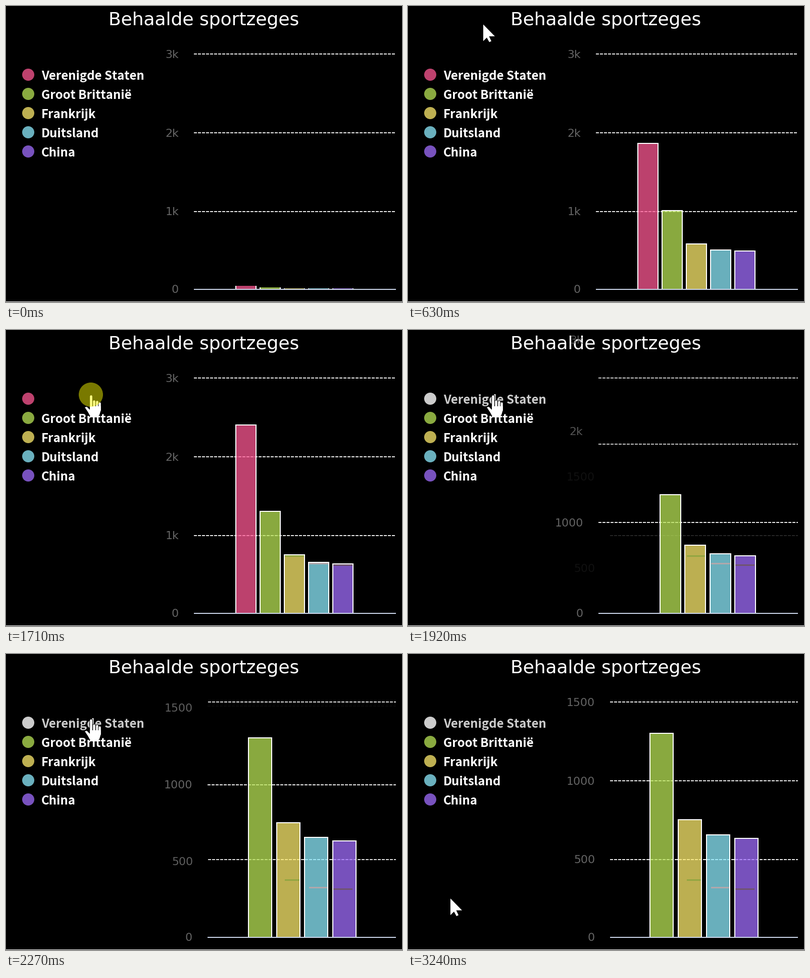
Animation of 784x586 px, one loop 3300 ms. Source, as a matplotlib script:

```python
import math

import matplotlib.pyplot as plt
from matplotlib.animation import FuncAnimation
from matplotlib.patches import Circle, Polygon, Rectangle
from matplotlib.patheffects import withStroke
from matplotlib.transforms import Affine2D

W, H, DPI = 784, 586, 100
PX = 72 / DPI
LOOP, INTERVAL, TICKS = 3300, 20, 48

# Chart geometry: axis line, height of the plot, and the two full scales
BASE, SPAN = 561, 467
WIDE, NARROW = 3000, 1500

# Ticks at which something happens
STREAK, HOVER, CLICK, REDRAW, LEAVE = 12, 17, 25, 26, 43

MEDALS = {
    "Verenigde Staten": (2400, (190, 66, 110)),
    "Groot Brittanië": (1302, (138, 170, 64)),
    "Frankrijk": (750, (190, 176, 82)),
    "Duitsland": (655, (106, 176, 190)),
    "China": (633, (120, 82, 190)),
}
STREAK_COLORS = {2: "#92a642", 3: "#b0a8ac", 4: "#705470"}


def rgb(color):
    return tuple(c / 255 for c in color)


def mix(a, b, p):
    return a + (b - a) * p


def ease(p):
    return 0.5 - 0.5 * math.cos(math.pi * min(max(p, 0), 1))


def scaled(value, p):
    """Height of a value while the scale goes from wide to narrow."""
    return mix(SPAN * value / WIDE, SPAN * value / NARROW, p)


def pointer_at(tick):
    """Glide in to the first legend item, later swing away to the lower left."""
    if tick < LEAVE:
        e = 1 - max(1 - (tick - 5) / 14, 0) ** 1.45
        return mix(137, 168, e), mix(-21, 128, e)
    e = 1 - (1 - (tick - 42) / 5) ** 2
    return mix(168, 84, e) - 45 * math.sin(math.pi * e), mix(128, 484, e)


fig = plt.figure(figsize=(W / DPI, H / DPI), dpi=DPI, facecolor="black")
ax = fig.add_axes([0, 0, 1, 1])
ax.set_xlim(0, W)
ax.set_ylim(H, 0)
ax.axis("off")


def text(x, y, label, size, color="white", font="DejaVu Sans", **kwargs):
    return ax.text(x, y, label, fontsize=size * PX, color=color, family=font,
                   va="baseline", **kwargs)


def rect(x, y, w, h, color, z=3, **kwargs):
    return ax.add_patch(Rectangle((x, y), w, h, color=color, lw=0, zorder=z, **kwargs))


class Bar:
    """Translucent column with a white border on the left, top and right."""

    def __init__(self, index, value, color):
        self.index, self.value = index, value
        bright = tuple(min(c / 0.75, 1) for c in rgb(color))
        self.fill = rect(0, 0, 0, 0, bright, alpha=0.75)
        self.edges = [rect(0, 0, 0, 0, "white", 5) for _ in range(3)]

    def place(self, p, grow):
        left = round(mix(454 + 48 * self.index, 422 + 56 * self.index, p))
        width = round(mix(42, 48, p))
        height = round(scaled(self.value, p) * grow)
        top = BASE - height
        self.right = left + width
        self.fill.set_bounds(left + 2, top, width - 4, height)
        self.edges[0].set_bounds(left, top, 2, height)
        self.edges[1].set_bounds(self.right - 2, top, 2, height)
        self.edges[2].set_bounds(left, top, width, 2 * grow)

    def show(self, visible):
        for part in (self.fill, *self.edges):
            part.set_visible(visible)


class GridLine:
    """Dashed line and label; `fade` is "in" or "out" if only one scale has it."""

    def __init__(self, value, label, fade=None):
        self.value, self.fade = value, fade
        self.line, = ax.plot([], [], color="#e6e6e6", lw=2 * PX, ls=(0, (3, 1)), zorder=2)
        self.label = text(0, 0, label, 22, "#666666", ha="right")

    def y(self, p):
        return BASE + 1 - scaled(self.value, p)

    def place(self, p):
        slide = 1 if self.fade == "in" else p
        end = max(self.y(1), BASE + 1 - SPAN)
        y = math.ceil(mix(self.y(0), end, slide))
        self.line.set_data([mix(372, 400, slide), 772], [y, y])
        self.label.set_position((mix(342, 370, slide), self.y(p) + 8))
        for part in (self.line, self.label):
            part.set_alpha({"in": p, "out": 1 - p}.get(self.fade, 1))


text(391.5, 38, "Behaalde sportzeges", 36, ha="center")
markers, names, bars = [], [], []
for i, (country, (value, color)) in enumerate(MEDALS.items()):
    markers.append(ax.add_patch(Circle((44, 136 + 38 * i), 12, fc=rgb(color), lw=0)))
    names.append(text(70, 146 + 38 * i, country, 24, font="Noto Sans CJK JP", weight="bold"))
    bars.append(Bar(i, value, color))
first_color = markers[0].get_facecolor()

streaks = {i: rect(456 + 48 * i, BASE - scaled(bars[i].value, 0) + 2, 38, 3, color, 4)
           for i, color in STREAK_COLORS.items()}

grid = [GridLine(3000, "3k", "out"), GridLine(2000, "2k", "out"), GridLine(1000, "1k"),
        GridLine(1500, "1500", "in"), GridLine(500, "500", "in")]
thousand = grid[2].label
zero_line, = ax.plot([], [], color="#ccd6eb", lw=2 * PX, solid_capstyle="butt", zorder=6)
zero_label = text(342, 568, "0", 22, "#666666", ha="right")
rect(0, H - 1, W, 1, "white")

# Both pointers are drawn around their tip and moved by one shared transform.
move = Affine2D()
outlined = dict(transform=move + ax.transData, zorder=8)


def stroke(width):
    return [withStroke(linewidth=width * PX, foreground="black")]


def shape(points):
    return ax.add_patch(Polygon(points, fc="white", lw=0, path_effects=stroke(2), **outlined))


arrow = shape([(0, 0), (0, 33), (7, 26), (12, 35), (16, 33), (11.5, 23.5), (23, 23.5)])
hand = [ax.plot([x, x], [top, 30], color="white", lw=4.6 * PX, solid_capstyle="round",
                path_effects=stroke(6.6), **outlined)[0]
        for x, top in zip((0, 5.8, 11.6, 17.4), (3, 13, 14, 17))]
hand.append(ax.add_patch(Polygon(
    [(-2, 30), (-8, 24), (-12, 25), (-6, 34), (-1, 43), (3, 45), (12, 45),
     (17, 40), (19.7, 31), (19.7, 23), (-2, 23)], fc="white", lw=0, **outlined)))
click = ax.add_patch(Circle((168, 128), 24, fc="#ffff00", alpha=0.48, lw=0, zorder=9))


def update(frame):
    # The recording shows fewer, coarser steps than the animation has frames.
    tick = ((frame + 1) * INTERVAL - 1) * TICKS // LOOP
    redrawn = tick >= REDRAW
    grow = ease((tick + 1.3) / 15)
    p = ease(0.503 + 0.119 * (tick - 30)) if redrawn else 0

    for bar in bars:
        bar.place(p, grow)
    bars[0].show(not redrawn)
    for i, streak in streaks.items():
        streak.set_visible(tick >= STREAK)
        streak.set_width(min(38, bars[i].right - 2 - streak.get_x()))

    for line in grid:
        line.place(p)
    thousand.set_text("1000" if redrawn else "1k")
    zero_line.set_data([mix(372, 400, p), 772], [BASE, BASE])
    zero_label.set_x(mix(342, 370, p))

    names[0].set_visible(not HOVER <= tick < REDRAW)
    names[0].set_color("#cccccc" if redrawn else "white")
    markers[0].set_facecolor("#cccccc" if redrawn else first_color)

    move.clear().translate(*pointer_at(tick))
    hovering = HOVER <= tick < LEAVE
    arrow.set_visible(not hovering)
    for part in hand:
        part.set_visible(hovering)
    click.set_visible(CLICK <= tick < CLICK + 3)
    return []


animation = FuncAnimation(fig, update, frames=LOOP // INTERVAL, interval=INTERVAL,
                          init_func=lambda: [], repeat=True, repeat_delay=0, blit=False)
plt.show()
```
